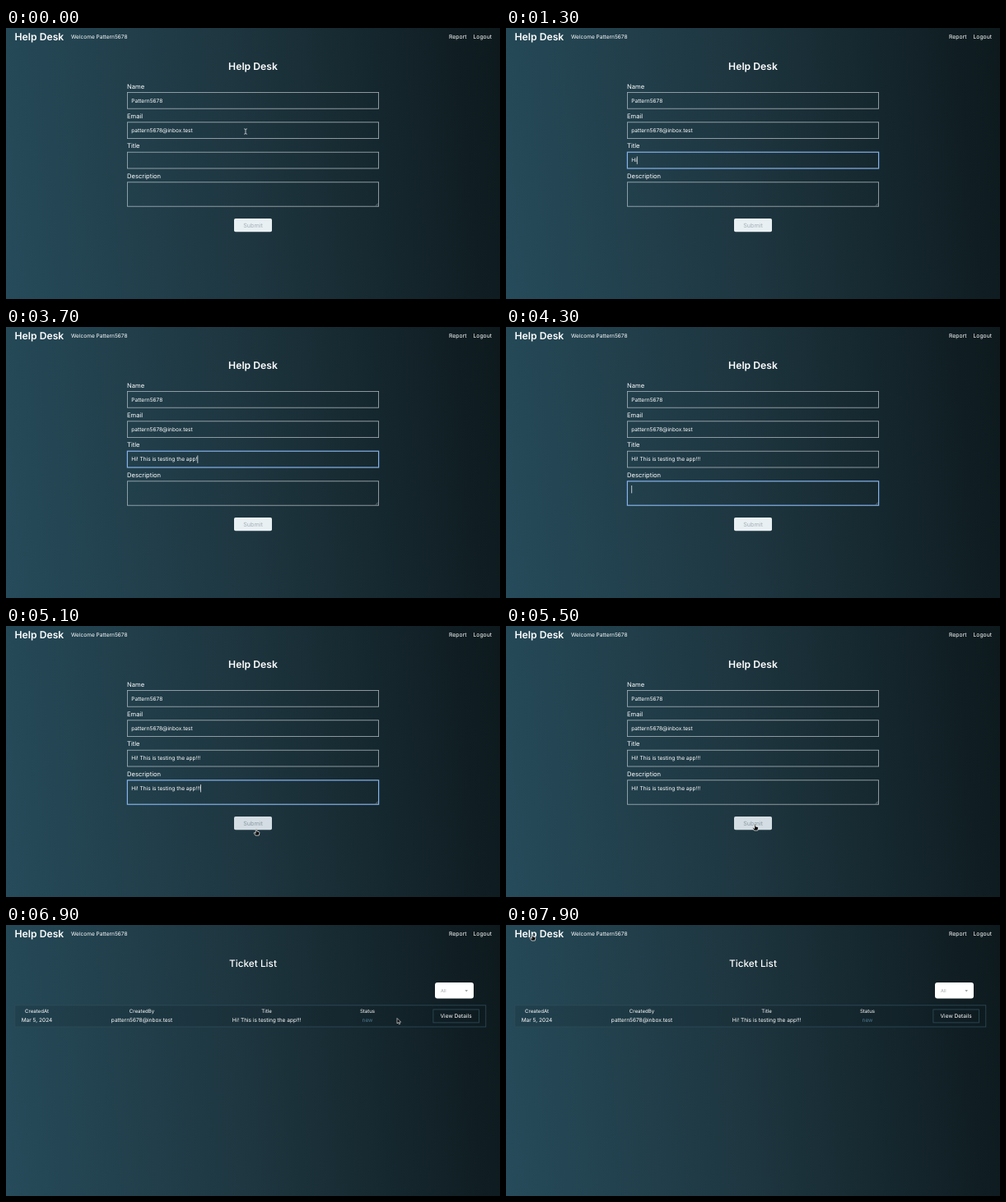
Recreate the animation shown at these times as an HTML page. Size 600x330 px, loop 8000 ms.

```html
<!DOCTYPE html>
<html lang="en">
<head>
<meta charset="utf-8">
<title>Help Desk</title>
<style>
html, body { margin: 0; width: 100%; height: 100%; overflow: hidden; }
body { background: linear-gradient(84deg, #264b5a, #1e3640 48%, #0d191d); }
svg { display: block; width: 600px; height: 330px; }
text { font: 6.55px Inter, "Open Sans", sans-serif; fill: #fff; white-space: pre; text-rendering: geometricPrecision; }
.logo { font-size: 12.2px; font-weight: 600; }
.head { font-size: 11.8px; font-weight: 500; }
.label { font-size: 7.6px; }
.nav { font-size: 6.8px; }
.col { font-size: 6.1px; }
.mid { text-anchor: middle; }
.field { fill: none; stroke: #a9b5ba; stroke-width: .8; }
.focus { stroke: #86b2ea; stroke-width: 1.2; }
#submit text { font-size: 7.2px; fill: #a3afb5; }
#submit rect { fill: #e9f0f4; }
#submit.hover rect { fill: #d3dde3; }
#submit.hover text { fill: #8b9aa2; }
.line { fill: none; stroke: #2f4d59; stroke-width: .8; }
</style>
</head>
<body>
<svg viewBox="0 0 600 330">
  <text class="logo" x="10.5" y="14.5">Help Desk</text>
  <text x="79" y="12.5">Welcome Pattern5678</text>
  <text class="nav" x="538" y="12.5">Report</text>
  <text class="nav" x="567.5" y="12.5">Logout</text>

  <g id="form">
    <text class="logo mid" x="300" y="51">Help Desk</text>
    <text class="label" x="147" y="73.5">Name</text>
    <text class="label" x="147" y="110">Email</text>
    <text class="label" x="147" y="146.3">Title</text>
    <text class="label" x="147" y="182.8">Description</text>
    <rect class="field" x="147.4" y="78.4" width="305.2" height="19.8" />
    <rect class="field" x="147.4" y="114.8" width="305.2" height="19.8" />
    <rect class="field" id="titleBox" x="147.4" y="151.2" width="305.2" height="19.8" />
    <rect class="field" id="descBox" x="147.4" y="187.8" width="305.2" height="29.4" />
    <path class="field" d="M449 216.5l3-3M451 216.5l1-1" style="stroke-width:.5" />
    <text x="152.3" y="90.5">Pattern5678</text>
    <text x="152.3" y="127">pattern5678@inbox.test</text>
    <text id="title" x="152.3" y="163.3"></text>
    <text id="desc" x="152.3" y="200"></text>
    <rect id="caret" width=".7" height="9.4" fill="#fff" />
    <g id="submit">
      <rect x="277" y="232" width="46" height="16.2" rx="1.8" />
      <text class="mid" x="300" y="242.6">Submit</text>
    </g>
  </g>

  <g id="list">
    <text class="head mid" x="300" y="51">Ticket List</text>
    <rect x="521" y="70" width="47" height="19.5" rx="3" fill="#fff" />
    <text x="528" y="82" style="font-size:5.6px;fill:#a2a8ab">All</text>
    <path d="M557.4 79.2h3.6l-1.8 2z" fill="#8a9094" />
    <rect x="10.8" y="97.8" width="572" height="26.2" fill="#0b1a20" fill-opacity=".15" />
    <rect class="line" x="10.8" y="97.8" width="572" height="26.2" />
    <text class="col mid" x="37.5" y="107.2">CreatedAt</text>
    <text class="col mid" x="165" y="107.2">CreatedBy</text>
    <text class="col mid" x="316.5" y="107.2">Title</text>
    <text class="col mid" x="439" y="107.2">Status</text>
    <text class="mid" x="37.5" y="118.2">Mar 5, 2024</text>
    <text class="mid" x="165" y="118.2">pattern5678@inbox.test</text>
    <text class="mid" x="316.7" y="118.2">Hi! This is testing the app!!!</text>
    <text class="mid" x="439" y="118.2" style="fill:#4b778c">new</text>
    <rect class="line" x="518.9" y="102.9" width="55.6" height="16" />
    <text class="mid" x="546.6" y="113.3">View Details</text>
  </g>

  <g id="pointer" stroke-linejoin="round">
    <path id="beam" d="M-1.8 -3.2Q0 -3.2 0 -2.2Q0 -3.2 1.8 -3.2M0 -2.2V2.2M-1.8 3.2Q0 3.2 0 2.2Q0 3.2 1.8 3.2" fill="none" stroke="#dfe5e8" stroke-width=".8" />
    <path id="arrow" d="M0 0V6.4L1.5 5.1L2.5 7.4L3.6 6.9L2.6 4.7H4.6Z" fill="#000" stroke="#fff" stroke-width=".6" />
    <path id="hand" d="M-.7 .5Q0 -.5 .7 .5V3L3.3 3.7Q4 4 3.9 5L3.2 8H-1L-3 5Q-2.6 4.1 -1.7 4.8L-.7 5.6Z" fill="#000" stroke="#fff" stroke-width=".7" />
  </g>
</svg>
<script>
const $ = id => document.getElementById(id);
const show = (id, on) => $(id).style.display = on ? '' : 'none';
const message = 'Hi! This is testing the app!!!';

// [tick, letters typed]; a tick is 100 ms
const typing = [[0, 0], [10, 1], [13, 2], [14, 3], [15, 5], [16, 6], [17, 8], [18, 9], [19, 11], [20, 12],
  [21, 14], [22, 15], [23, 17], [26, 16], [27, 17], [28, 19], [29, 20], [30, 22], [32, 23], [33, 25],
  [34, 27], [37, 28], [38, 29], [39, 30]];

// [tick, x, y, shape]
const moves = [[0, 291, 126, 'beam'], [1, 288, 130, 'beam'], [3, 240, 163, 'beam'], [10, 0, 0, ''],
  [45, 262, 200, 'beam'], [46, 272, 232, 'arrow'], [48, 272, 232, 'arrow'], [49, 284, 236, 'hand'],
  [51, 304, 247, 'hand'], [53, 306, 243, 'hand'], [55, 302.5, 241, 'hand'], [56, 305, 238, 'arrow'],
  [57, 312, 152, 'arrow'], [60, 136, 113, 'arrow'], [62, 269.5, 114.8, 'arrow'], [64, 356, 112, 'arrow'],
  [66, 280, 115, 'arrow'], [70, 540, 113, 'hand'], [72, 549, 112, 'arrow'], [74, 549, 8, 'hand'],
  [75, 0, 0, ''], [77, 32, 22, 'hand'], [79, 32, 11, 'hand']];

const last = (keys, tick) => keys.findLastIndex(k => k[0] <= tick);
const within = (tick, from, to) => tick >= from && tick < to;

function drawPointer(tick) {
  const i = last(moves, tick), [t, x, y, shape] = moves[i];
  const next = moves[i + 1];
  const [t2, x2, y2] = next && next[3] ? next : [t + 1, x, y];
  const p = (tick - t) / (t2 - t);
  for (const id of ['beam', 'arrow', 'hand']) show(id, id === shape);
  $('pointer').setAttribute('transform', `translate(${x + (x2 - x) * p} ${y + (y2 - y) * p})`);
}

function drawForm(tick) {
  const inTitle = within(tick, 3, 41), inDesc = within(tick, 41, 53);
  $('titleBox').classList.toggle('focus', inTitle);
  $('descBox').classList.toggle('focus', inDesc);
  $('title').textContent = message.slice(0, typing[last(typing, tick)][1]);
  $('desc').textContent = tick < 44 ? '' : message;
  $('submit').classList.toggle('hover', tick >= 49);
  const blink = within(tick, 5, 8) || tick === 26 || tick === 42;
  show('caret', (inTitle || inDesc) && !blink);
  $('caret').setAttribute('x', 152.4 + $(inDesc ? 'desc' : 'title').getComputedTextLength());
  $('caret').setAttribute('y', inDesc ? 193 : 156.4);
}

function frame() {
  const tick = Math.floor(performance.now() % 8000 / 100);
  show('form', tick < 56);
  show('list', tick >= 56);
  if (tick < 56) drawForm(tick);
  drawPointer(tick);
  requestAnimationFrame(frame);
}
frame();
</script>
</body>
</html>
```
